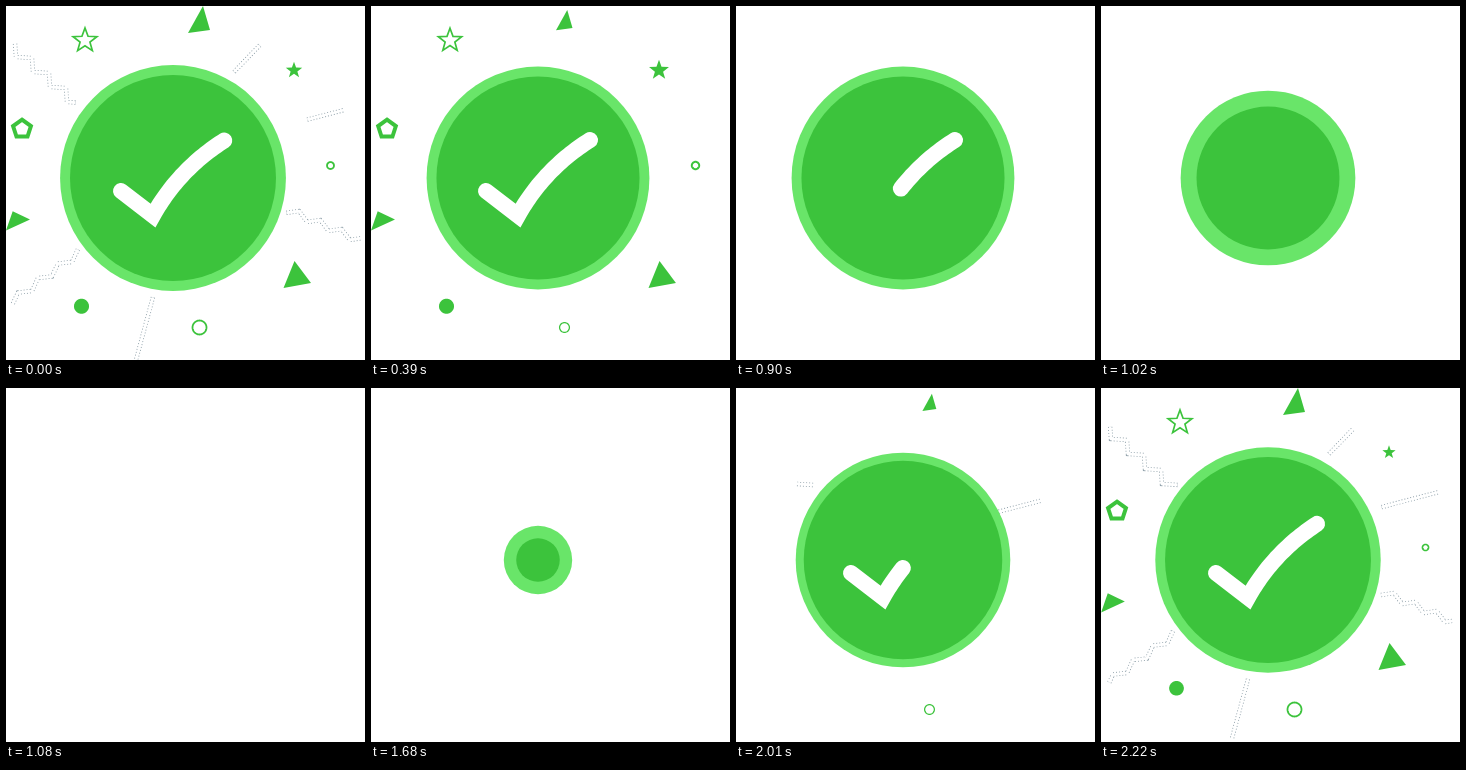
Write an HTML page with a canvas that moves like this. It is 359 px wide and 354 px high and loops after 2250 ms.

```html
<!DOCTYPE html>
<html lang="en">
<head>
<meta charset="utf-8">
<title>Success check</title>
<style>
  html, body { margin: 0; width: 100%; height: 100%; overflow: hidden; background: #fff; }
  canvas { display: block; width: 359px; height: 354px; }
</style>
</head>
<body>
<canvas id="stage" width="359" height="354"></canvas>
<script>
// The loop opens on the finished badge, so times run from the intro at 1650 past the loop end.
const LOOP = 2250, STEP = 30, WRAP = 1380, INTRO = 1650;
const GREEN = '#3cc33c', RIM = '#69e569', EDGE = '#8799a3';
const ctx = document.getElementById('stage').getContext('2d');

const progress = (t, from, to) => Math.min(1, Math.max(0, (t - from) / (to - from)));
const easeOut = (p, power = 2) => 1 - (1 - p) ** power;
const easeIn = (p, power = 2) => p ** power;

// Puts the part of a polyline between the fractions a and b on the path.
function trim(points, a, b) {
  const spans = points.slice(1).map(([x, y], i) => Math.hypot(x - points[i][0], y - points[i][1]));
  const total = spans.reduce((sum, len) => sum + len, 0);
  let pos = 0;
  ctx.beginPath();
  spans.forEach((len, i) => {
    const [x0, y0] = points[i], [x1, y1] = points[i + 1];
    const s = Math.max(0, (a * total - pos) / len), e = Math.min(1, (b * total - pos) / len);
    if (e > s) {
      for (const k of [s, e]) ctx.lineTo(x0 + (x1 - x0) * k, y0 + (y1 - y0) * k);
    }
    pos += len;
  });
}

// Corners around the origin; several radii alternate, as in a star.
function radial(count, ...radii) {
  return Array.from({ length: count }, (_, i) => {
    const a = -Math.PI / 2 + i * 2 * Math.PI / count, r = radii[i % radii.length];
    return [r * Math.cos(a), r * Math.sin(a)];
  });
}

const round = r => radial(48, r);

// A path that takes two steps in turn.
function stairs(start, stepA, stepB, count) {
  const points = [start];
  for (let i = 0; i < count; i++) {
    const [x, y] = points[i], [dx, dy] = i % 2 ? stepB : stepA;
    points.push([x + dx, y + dy]);
  }
  return points;
}

// Shapes with a line are outlined, the others are filled.
const shapes = [
  { at: [194, 16], points: [[3, -16], [10, 8], [-12, 11]], start: 1935 },
  { at: [193.5, 321.5], points: round(7), line: 1.8, start: 1925 },
  { at: [79, 34.5], points: radial(10, 12.5, 5.2), line: 1.7, start: 2010 },
  { at: [16, 123], points: radial(5, 9.4), line: 4, start: 2020 },
  { at: [290, 270], points: [[-1.5, -15], [15, 7], [-12.5, 12]], start: 2030 },
  { at: [10, 214.5], points: [[-10, 10], [-3.3, -9.3], [14, -1]], start: 2050 },
  { at: [75.5, 300.3], points: round(7.5), start: 2060 },
  { at: [324.5, 159.5], points: round(3.7), line: 2, start: 2110 },
  { at: [288, 64.3], points: radial(10, 10.5, 4.3), start: 2140 }
];

function drawShape({ at, points, line, start }, t) {
  const grow = easeOut(progress(t, start, start + 190));
  const shrink = easeIn(progress(t, start + 600, start + 810));
  const scale = grow * (1 - shrink);
  if (scale <= 0) return;
  ctx.save();
  ctx.translate(...at);
  ctx.scale(scale, scale);
  ctx.beginPath();
  points.forEach(p => ctx.lineTo(...p));
  ctx.closePath();
  ctx.fillStyle = ctx.strokeStyle = GREEN;
  ctx.lineWidth = line || 1;
  if (line) ctx.stroke(); else ctx.fill();
  ctx.restore();
}

const streaks = [
  { points: [[254, 126], [338, 104]], start: 1910 },
  { points: stairs([77, 97], [-16, -1], [-1, -14], 8), start: 1990 },
  { points: stairs([72, 243], [-6, 13], [-14, 1.5], 7), start: 2020 },
  { points: stairs([280, 207], [13, -2], [8.3, 11], 7), start: 2020 },
  { points: [[228, 66], [254, 39]], start: 2020 },
  { points: [[147, 291], [130, 354]], start: 2020 }
];

// White ribbons that show only by their dotted edges.
function drawStreak({ points, start }, t) {
  const head = easeOut(progress(t, start, start + 260));
  const tail = easeIn(progress(t, start + 220, start + 380));
  if (head <= tail) return;
  trim(points, tail, head);
  ctx.lineCap = 'butt';
  ctx.setLineDash([1, 2]);
  ctx.lineWidth = 4.4;
  ctx.strokeStyle = EDGE;
  ctx.stroke();
  ctx.setLineDash([]);
  ctx.lineWidth = 2.8;
  ctx.strokeStyle = '#fff';
  ctx.stroke();
}

// Pops to the first radius, swells to the full one, settles, and collapses at the end.
function drawDisc(t, color, { first, full, power, lead }) {
  const pop = first * easeOut(progress(t, INTRO + lead, 1800));
  const swell = (full - first) * easeOut(progress(t, 1800, 2280), power);
  const settle = 1 - 0.014 * progress(t, 2310, 2520);
  const collapse = 1 - easeIn(progress(t, 3180 - lead, 3330 - lead), 3);
  ctx.beginPath();
  ctx.arc(167, 172, (pop + swell) * settle * collapse, 0, Math.PI * 2);
  ctx.fillStyle = color;
  ctx.fill();
}

// A straight short arm, then a curved long arm.
const check = [[115, 185]];
for (let s = 0; s <= 1; s += 1 / 32) {
  const bend = (a, b, c) => (1 - s) ** 2 * a + 2 * (1 - s) * s * b + s * s * c;
  check.push([bend(147, 173, 219), bend(209.5, 163, 134)]);
}

function drawCheck(t) {
  const tail = easeIn(progress(t, 2970, 3225)), head = easeOut(progress(t, 1890, 2280));
  if (head <= tail) return;
  trim(check, tail, head);
  ctx.lineCap = 'round';
  ctx.lineWidth = 16;
  ctx.strokeStyle = '#fff';
  ctx.stroke();
}

function draw(now) {
  const clock = Math.floor((now % LOOP) / STEP) * STEP;
  const t = clock < WRAP ? clock + LOOP : clock;
  ctx.fillStyle = '#fff';
  ctx.fillRect(0, 0, 359, 354);
  streaks.forEach(s => drawStreak(s, t));
  shapes.forEach(s => drawShape(s, t));
  drawDisc(t, RIM, { first: 95, full: 113, power: 2, lead: 0 });
  drawDisc(t, GREEN, { first: 82, full: 103, power: 3, lead: 10 });
  drawCheck(t);
}

const begin = performance.now();
function tick() {
  draw(performance.now() - begin);
  requestAnimationFrame(tick);
}
tick();
</script>
</body>
</html>
```
